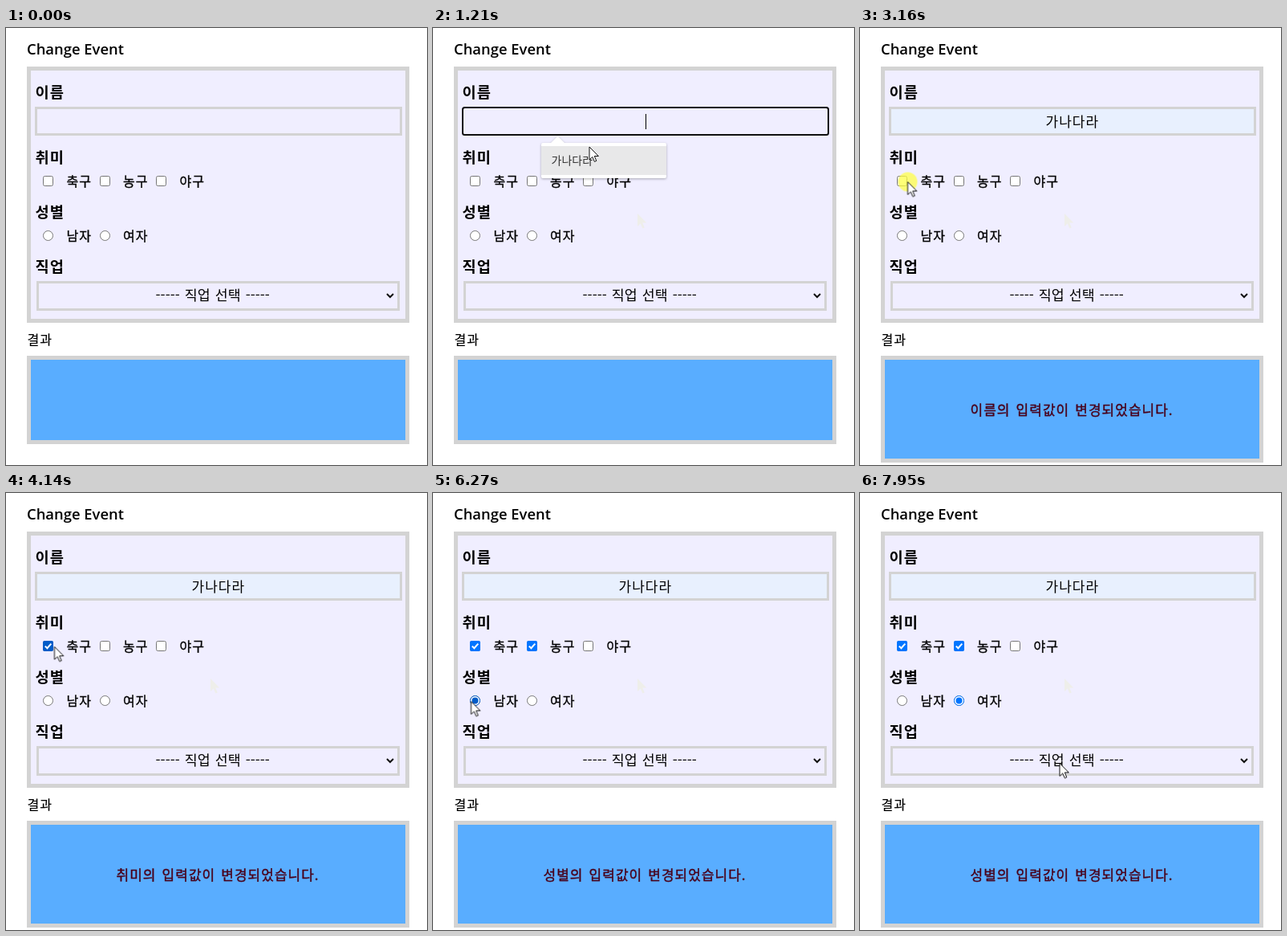
These frames come from a looping animation (525 px wide and 544 px high, 8000 ms). An HTML page:

```html
<!DOCTYPE html>
<html lang="ko">
<head>
<meta charset="utf-8">
<title>Change Event</title>
<style>
html, body { margin: 0; width: 100%; height: 100%; overflow: hidden; background: #fff; }
svg { display: block; width: 525px; height: 544px; }
text { font-family: "Noto Sans CJK KR", "Noto Sans CJK", "Noto Sans KR", sans-serif; font-size: 16px; }
.title { font: 600 18.4px "Open Sans", "Noto Sans", sans-serif; }
.head { font-size: 18.72px; font-weight: 700; letter-spacing: 1px; }
.label { letter-spacing: 1px; stroke: #000; stroke-width: .35px; }
.result { font-size: 17px; letter-spacing: 1px; word-spacing: 1.4px; fill: #48001a; stroke: #48001a; stroke-width: .4px; }
.value { font-size: 17px; letter-spacing: 1px; }
.select { font-size: 17.3px; word-spacing: 1.3px; text-anchor: middle; }
.hint { font-size: 14px; fill: #333; }
.line { fill: none; stroke: #d3d3d3; }
.box { fill: #fff; stroke: #767676; }

/* 8 s loop, so 1% is 80 ms; values hold until the next key */
.a { animation: 8s step-end infinite; }
.focus { animation-name: focus; }
.auto { animation-name: auto; }
.caret1 { animation-name: caret1; }
.caret2 { animation-name: caret2; }
.popup { animation-name: popup; }
.hover { animation-name: hover; }
.grow { animation-name: grow; }
.name { animation-name: name; }
.hobby { animation-name: hobby; }
.gender { animation-name: gender; }
.check1 { animation-name: check1; }
.check2 { animation-name: check2; }
.radio1 { animation-name: radio1; }
.radio2 { animation-name: radio2; }
.ghost { animation-name: ghost; }
.move { animation-name: move; }
.arrow { animation-name: arrow; }
.beam { animation-name: beam; }
.press { animation-name: press; }

@keyframes focus { 0%, 39.5%, 100% { opacity: 0 } 9.125% { opacity: 1 } }
@keyframes auto { 0% { opacity: 0 } 21.75%, 100% { opacity: 1 } }
@keyframes caret1 { 0%, 16.75%, 100% { opacity: 0 } 9.125% { opacity: 1 } }
@keyframes caret2 { 0%, 28.375%, 39.5%, 100% { opacity: 0 } 21.75%, 35% { opacity: 1 } }
@keyframes popup {
  0%, 23.5%, 100% { opacity: 0 }
  10% { opacity: .5 }
  10.875% { opacity: 1 }
  21.75% { opacity: .75 }
  22.625% { opacity: .35 }
}
@keyframes hover { 0% { opacity: 0 } 15.125%, 100% { opacity: 1 } }
@keyframes grow { 0% { height: 105px } 21.75%, 100% { height: 128px } }
@keyframes name { 0%, 48.375%, 100% { opacity: 0 } 21.75% { opacity: 1 } }
@keyframes hobby { 0%, 78.375%, 100% { opacity: 0 } 48.375% { opacity: 1 } }
@keyframes gender { 0% { opacity: 0 } 78.375%, 100% { opacity: 1 } }
@keyframes check1 {
  0% { opacity: 0; color: #005cc8 }
  48.375% { opacity: 1; color: #005cc8 }
  52.75%, 100% { opacity: 1; color: #0075ff }
}
@keyframes check2 {
  0% { opacity: 0; color: #005cc8 }
  64.25% { opacity: 1; color: #005cc8 }
  68.375%, 100% { opacity: 1; color: #0075ff }
}
@keyframes radio1 {
  0%, 91.75%, 100% { opacity: 0; color: #005cc8 }
  78.375% { opacity: 1; color: #005cc8 }
  83.45% { opacity: 1; color: #0075ff }
}
@keyframes radio2 {
  0% { opacity: 0; color: #005cc8 }
  91.75% { opacity: 1; color: #005cc8 }
  95.075%, 100% { opacity: 1; color: #0075ff }
}
@keyframes ghost { 0% { opacity: 0 } 4.125%, 100% { opacity: .9 } }
@keyframes arrow { 0%, 4.125% { opacity: 0 } 1.625%, 14.25%, 100% { opacity: 1 } }
@keyframes beam { 0%, 14.25%, 100% { opacity: 0 } 4.125% { opacity: 1 } }
@keyframes press {
  0%, 10.875%, 21.75%, 41.125%, 48.375%, 64.25%, 78.375%, 91.75%, 100% { opacity: 0 }
  9.125%, 19.25%, 39.5%, 46.75%, 61.75%, 76.75%, 90.125% { opacity: .72 }
}
@keyframes move {
  0% { transform: translate(477px, 468px) }
  2.5% { transform: translate(370px, 345px) }
  3.3% { transform: translate(255px, 231px) }
  4.125% { transform: translate(176.5px, 129px) }
  5.875% { transform: translate(183px, 122px) }
  6.625% { transform: translate(190.5px, 116px) }
  14.25% { transform: translate(192px, 135px) }
  15.125% { transform: translate(195px, 148px) }
  16% { transform: translate(195px, 158px) }
  16.875% { transform: translate(195px, 165px) }
  28.375% { transform: translate(195px, 165px); animation-timing-function: steps(4, start) }
  32.075% { transform: translate(125px, 209px); animation-timing-function: steps(5, start) }
  36.7% { transform: translate(59.5px, 191.5px) }
  44.375% { transform: translate(59.5px, 191.5px); animation-timing-function: steps(2, start) }
  45.875% { transform: translate(48px, 191px) }
  51.75% { transform: translate(48px, 191px); animation-timing-function: steps(7, start) }
  58.75% { transform: translate(135px, 193px); animation-timing-function: steps(3, start) }
  61.75% { transform: translate(120.5px, 193px) }
  67.5% { transform: translate(120.5px, 193px); animation-timing-function: steps(4, start) }
  70.85% { transform: translate(66px, 276px); animation-timing-function: steps(3, start) }
  73.36% { transform: translate(48px, 260px) }
  75% { transform: translate(47.5px, 259.5px) }
  82.625% { transform: translate(47.5px, 259.5px); animation-timing-function: steps(6, start) }
  87.575% { transform: translate(124px, 260px) }
  94.25% { transform: translate(124px, 260px); animation-timing-function: steps(7, start) }
  100% { transform: translate(249px, 336.5px) }
}
</style>
</head>
<body>
<svg viewBox="0 0 525 544">
  <defs>
    <path id="pointer" d="M0 0V16L3.8 12.5L6.4 18.4L8.8 17.4L6.3 11.5H11.4Z"/>
    <rect id="square" x=".5" y=".5" width="12" height="12" rx="2"/>
    <g id="tick">
      <rect width="13" height="13" rx="2" fill="currentColor"/>
      <path d="M2.8 6.6L5.4 9.2L10.3 3.6" fill="none" stroke="#fff" stroke-width="2"/>
    </g>
    <g id="dot">
      <circle r="6" fill="#fff" stroke="currentColor"/>
      <circle r="4" fill="currentColor"/>
    </g>
  </defs>

  <text class="title" x="26" y="33">Change Event</text>
  <rect x="28.5" y="50.5" width="472" height="314" fill="#f0eeff" stroke="#d3d3d3" stroke-width="5"/>

  <text class="head" x="36.5" y="87">이름</text>
  <rect class="line" x="37.5" y="99.5" width="455" height="33" stroke-width="3"/>
  <rect class="a auto" x="39" y="101" width="452" height="30" fill="#e8f0fe"/>
  <g class="a focus">
    <rect x="37.5" y="99.5" width="455" height="33" fill="none" stroke="#f0eeff" stroke-width="3"/>
    <rect x="37" y="99" width="456" height="34" rx="2.5" fill="none" stroke="#101010" stroke-width="2"/>
  </g>
  <text class="value a auto" x="231.5" y="123">가나다라</text>
  <rect class="a caret1" x="265" y="107" width="1" height="19"/>
  <rect class="a caret2" x="299" y="108" width="1" height="19"/>

  <text class="head" x="36.5" y="168">취미</text>
  <use href="#square" class="box" x="46" y="184"/>
  <use href="#square" class="box" x="117" y="184"/>
  <use href="#square" class="box" x="187" y="184"/>
  <g class="a check1"><use href="#tick" x="46" y="184"/></g>
  <g class="a check2"><use href="#tick" x="117" y="184"/></g>
  <text class="label" x="75.5" y="197">축구</text>
  <text class="label" x="146" y="197">농구</text>
  <text class="label" x="216.5" y="197">야구</text>

  <text class="head" x="36.5" y="236">성별</text>
  <circle class="box" cx="52.5" cy="258.5" r="6"/>
  <circle class="box" cx="123.5" cy="258.5" r="6"/>
  <g class="a radio1"><use href="#dot" x="52.5" y="258.5"/></g>
  <g class="a radio2"><use href="#dot" x="123.5" y="258.5"/></g>
  <text class="label" x="75.5" y="265">남자</text>
  <text class="label" x="146" y="265">여자</text>

  <text class="head" x="36.5" y="304">직업</text>
  <rect class="line" x="39.5" y="316.5" width="450" height="34" stroke-width="3"/>
  <text class="select" x="257.7" y="339">----- 직업 선택 -----</text>
  <path d="M475 331L479 335L483 331" fill="none" stroke="#111" stroke-width="2"/>

  <text class="label" x="26.5" y="394" style="stroke-width:.15px">결과</text>
  <rect class="a grow" x="28.5" y="410.5" width="472" height="105" fill="#59adff" stroke="#d3d3d3" stroke-width="5"/>
  <g class="result">
    <text class="result a name" x="137.5" y="482">이름</text>
    <text class="result a hobby" x="137.5" y="482">취미</text>
    <text class="result a gender" x="137.5" y="482">성별</text>
    <text class="result a auto" x="170.8" y="482">의 입력값이 변경되었습니다.</text>
  </g>

  <use href="#pointer" class="a ghost" x="255" y="231" fill="#eeeee8"/>

  <g class="a popup">
    <g style="filter:drop-shadow(0 1px 1.5px rgba(0,0,0,.3))">
      <path d="M137 143H147L155.5 134.5L164 143H289Q291 143 291 145V185Q291 187 289 187H137Q135 187 135 185V145Q135 143 137 143Z" fill="#fff"/>
    </g>
    <rect class="a hover" x="135" y="147" width="156" height="36" fill="#e8e8e9"/>
    <text class="hint" x="147.5" y="169.5">가나다라</text>
  </g>

  <g class="a move">
    <circle class="a press" r="12" fill="#ffff40"/>
    <use href="#pointer" class="a arrow" fill="#fff" stroke="#111"/>
    <path class="a beam" d="M-3 -7.5H-1L0 -6.5L1 -7.5H3M0 -6.5V6.5M-3 7.5H-1L0 6.5L1 7.5H3" fill="none" stroke="#111"/>
  </g>
</svg>
</body>
</html>
```
